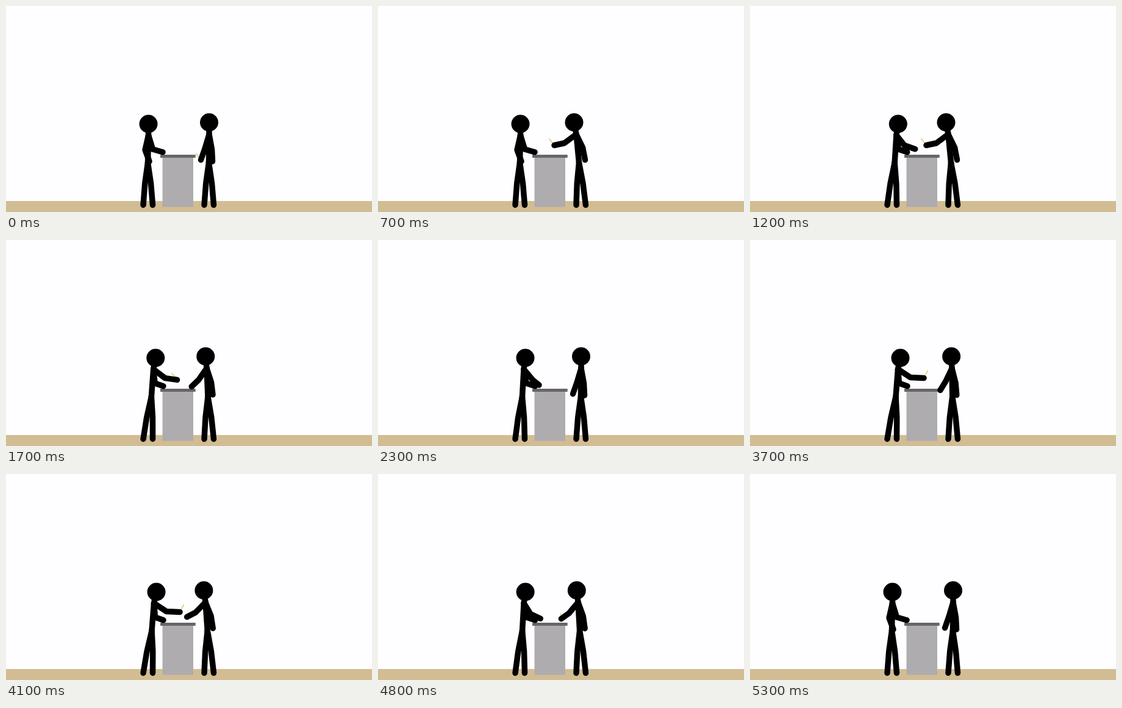
An HTML page with a canvas for the animation above (5800 ms loop, 600x338 px).

```html
<!DOCTYPE html>
<html lang="en">
<head>
<meta charset="utf-8">
<style>
html, body { margin: 0; width: 100%; height: 100%; overflow: hidden; background: #fefdff; }
canvas { display: block; }
</style>
</head>
<body>
<canvas id="stage" width="600" height="338"></canvas>
<script>
const ctx = document.getElementById('stage').getContext('2d');
const LOOP = 5800, STEP = 100;

// Poses of the moving arm
const LEFT = {
  rest: { head: 233.5, elbow: [228, 236], hand: [235, 255] },
  reach: { head: 246.5, elbow: [263, 225.5], hand: [285, 226.5] },
  write: { head: 241.5, elbow: [254, 230], hand: [267, 238] }
};
const RIGHT = {
  rest: { head: 333, elbow: [326, 234], hand: [319.5, 252.5] },
  reach: { head: 321.5, elbow: [305.5, 225], hand: [289, 228.5] }
};

const lerp = (a, b, p) => a + (b - a) * p;
const ramp = (t, from, to) => Math.min(1, Math.max(0, (t - from) / (to - from)));
const mixPoint = (a, b, p) => a.map((v, i) => lerp(v, b[i], p));
const mixPose = (a, b, p) => ({
  head: lerp(a.head, b.head, p),
  elbow: mixPoint(a.elbow, b.elbow, p),
  hand: mixPoint(a.hand, b.hand, p)
});

function line(color, width, ...points) {
  ctx.strokeStyle = color;
  ctx.lineWidth = width;
  ctx.beginPath();
  points.forEach(([x, y]) => ctx.lineTo(x, y));
  ctx.stroke();
}

function rect(color, x, y, w, h) {
  ctx.fillStyle = color;
  ctx.fillRect(x, y, w, h);
}

function figure(head, neck, hip, feet, arms) {
  ctx.fillStyle = '#000';
  ctx.beginPath();
  ctx.arc(head[0], head[1], 15, 0, Math.PI * 2);
  ctx.fill();
  line('#000', 9.5, head, neck, hip);
  feet.forEach((x, i) => {
    const knee = [(hip[0] + x) / 2 + (i ? 1 : -1), 291];
    line('#000', 9.5, hip, knee, [x, 326.5]);
  });
  arms.forEach(arm => line('#000', 9.5, neck, ...arm));
}

function drawLeft({ head, elbow, hand }) {
  const lean = (head - LEFT.rest.head) / 13;
  figure([head, 193.5], [233.5 + 9 * lean, 212], [232.5 + 6.5 * lean, 257], [225, 240.5], [
    [elbow, hand],
    [[240.5 + 4 * lean, 235], [257 + lean, 239.7]]
  ]);
}

function drawRight({ head, elbow, hand }) {
  const lean = (RIGHT.rest.head - head) / 11.5;
  figure([head, 191], [333 - 8 * lean, 210.5], [332.5 - 3 * lean, 257], [325, 340.5], [
    [elbow, hand],
    [[337.5 - 2 * lean, 235 - 3 * lean], [338.5 + lean, 255 - 2.5 * lean]]
  ]);
}

function drawPencil(t, [x, y]) {
  const angle = (-128 + 66 * ramp(t, 2800, 3400) - 33 * ramp(t, 4500, 4800)) * Math.PI / 180;
  const slide = 13.5 * ramp(t, 4500, 5300);
  const along = d => [x + d * Math.cos(angle), y + d * Math.sin(angle)];
  line('#e5c558', 1.5, along(13.5 - slide), along(-slide));
}

function draw(t) {
  const leaving = ramp(t, 4500, 5300);
  const leftReach = ramp(t, 700, 1400) - leaving;
  const rightReach = ramp(t, 200, 700) - ramp(t, 1400, 2000) + ramp(t, 3500, 4300) - leaving;
  const writing = ramp(t, 1600, 2000) - ramp(t, 2900, 3400);
  const left = mixPose(mixPose(LEFT.rest, LEFT.reach, leftReach), LEFT.write, writing);
  const right = mixPose(RIGHT.rest, RIGHT.reach, rightReach);
  if (writing === 1) left.hand[0] += 3.5 * Math.sin(ramp(t, 2000, 2900) * Math.PI * 4);

  rect('#fefdff', 0, 0, 600, 338);
  rect('#d2bc93', 0, 320, 600, 18);
  rect('#aeacae', 256.5, 248, 50.5, 81.5);
  rect('#676569', 253, 244, 57.7, 5);
  if (leaving < 1) drawPencil(t, t >= 1400 && t < 4500 ? left.hand : right.hand);
  drawLeft(left);
  drawRight(right);
}

function frame() {
  const t = performance.now() % LOOP;
  draw(Math.floor(t / STEP) * STEP);
  requestAnimationFrame(frame);
}

ctx.lineCap = ctx.lineJoin = 'round';
frame();
</script>
</body>
</html>
```
